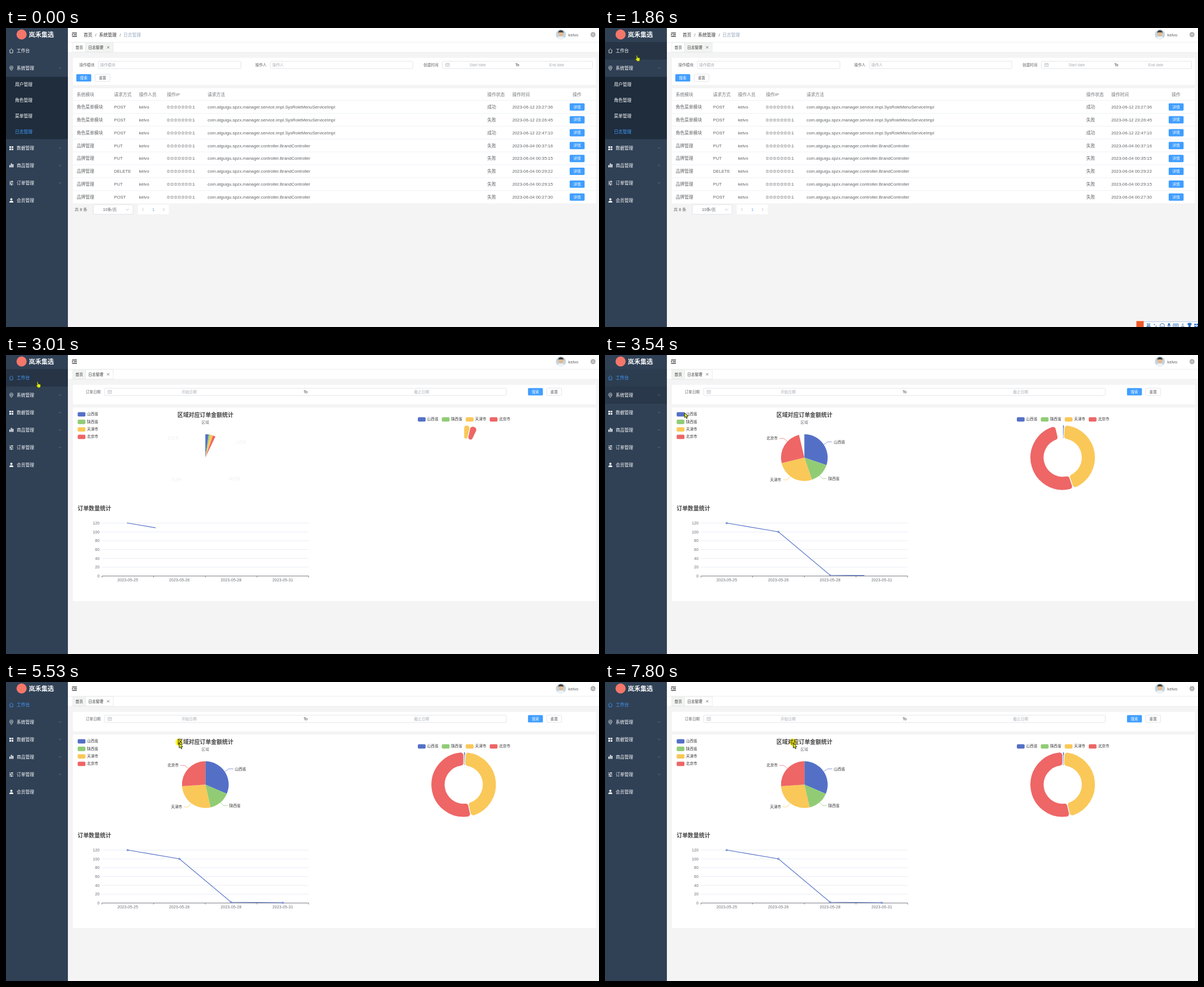
An HTML page that plays this animation: 1054 px wide and 531 px high, repeating every 8000 ms.

```html
<!DOCTYPE html>
<html lang="zh">
<head>
<meta charset="utf-8">
<style>
html, body { margin: 0; width: 100%; height: 100%; overflow: hidden; background: #f4f4f4; }
#stage { display: block; width: 100vw; height: 100vh; }
text { font-family: "Liberation Sans", "Noto Sans CJK SC", "Noto Sans CJK", sans-serif; white-space: pre; }
</style>
</head>
<body>
<svg id="stage" viewBox="0 0 1054 531" xmlns="http://www.w3.org/2000/svg"></svg>
<script>
const LOOP = 8000, CLICK = 2460, CHART = 2750;
const BLUE = '#409eff', GREY = '#606266', PALE = '#a8abb2', EDGE = '#dcdfe6';
const COLORS = ['#5470c6', '#91cc75', '#fac858', '#ee6666'];
const REGIONS = ['山西省', '陕西省', '天津市', '北京市'];

// Markup helpers; text is placed by its vertical centre
const text = (x, y, s, fill = GREY, size = 7.75, more = '') =>
  `<text x="${x}" y="${y + size * 0.36}" font-size="${size}" fill="${fill}" ${more}>${s}</text>`;
const rect = (x, y, w, h, fill, more = '') =>
  `<rect x="${x}" y="${y}" width="${w}" height="${h}" fill="${fill}" ${more}/>`;
const line = (d, color, w = 0.8, more = '') =>
  `<path d="${d}" fill="none" stroke="${color}" stroke-width="${w}" ${more}/>`;
const group = (id, body, more = '') => `<g id="${id}" ${more}>${body}</g>`;
const box = (x, y, w, h = 13) => rect(x, y, w, h, '#fff', `rx="1.6" stroke="${EDGE}" stroke-width=".8"`);
const MID = 'text-anchor="middle"', BOLD = 'font-weight="bold"', MEDIUM = 'font-weight="500"';
const small = (x, y, s, fill = GREY, more = '') => text(x, y, s, fill, 6.65, more);
const button = (x, y, s, primary) =>
  (primary ? rect(x, y, 26.5, 13, BLUE, 'rx="1.6"') : box(x, y, 26.5)) +
  small(x + 13.25, y + 6.5, s, primary ? '#fff' : GREY, MID + ' ' + MEDIUM);
const calendar = (x, y) =>
  line(`M${x} ${y - 2.5}h6.5v5.5h-6.5zM${x} ${y - .6}h6.5M${x + 2} ${y - 3.5}v1.6M${x + 4.5} ${y - 3.5}v1.6M${x + 1.5} ${y + 1.2}h3.5`, PALE, 0.6);

function sidebar() {
  const W = '#fff';
  const icon = {
    pin: line('M9.5 75.5C5 70 6.3 67.8 9.5 67.7S14 70 9.5 75.5z', W, 0.8) + '<circle cx="9.5" cy="70.8" r="1.1" fill="none" stroke="#fff" stroke-width=".7"/>',
    grid: [[6, 210], [10, 210], [6, 214], [10, 214]].map(p => rect(p[0], p[1], 3, 3, W)).join(''),
    bars: rect(6, 243.5, 1.8, 4, W) + rect(8.7, 240.5, 1.8, 7, W) + rect(11.4, 242, 1.8, 5.5, W),
    sliders: line('M6 272.5h7M6 275.3h7M6 278.1h7', W, 0.8) + rect(10, 271.3, 1.4, 2.4, W) + rect(7, 274.1, 1.4, 2.4, W) + rect(9, 276.9, 1.4, 2.4, W),
    person: '<circle cx="9.5" cy="304.2" r="1.9" fill="#fff"/><path d="M6 310q0-3.2 3.5-3.2t3.5 3.2z" fill="#fff"/>'
  };
  const item = (y, s) => text(19, y, s, W, 7.75, MEDIUM);
  const arrow = (y, id = '') => line('M-2.3-1.1 0 1.1 2.3-1.1', '#6c7a8c', 0.7, `id="${id}" transform="translate(96 ${y})"`);
  const subs = ['用户管理', '角色管理', '菜单管理', '日志管理'];
  return rect(0, 0, 110, 531, '#304156') +
    rect(0, 25, 110, 31, '#263445', 'id="hoverHome"') + rect(0, 56, 110, 30.5, '#263445', 'id="hoverSys"') +
    '<circle cx="27.7" cy="11.5" r="9" fill="#f4776a"/>' +
    text(40.5, 12, '岚禾集选', W, 11.2, BOLD) +
    group('home', line('M6 40.3 9.5 37 13 40.3M7 39.6v4.6h5v-4.6', 'currentColor', 0.8) + text(19, 40.5, '工作台', 'currentColor', 7.75, MEDIUM)) +
    icon.pin + item(71.5, '系统管理') + arrow(71, 'sysArrow') +
    `<svg id="sub" x="0" y="86.5" width="110" height="111" overflow="hidden">${rect(0, 0, 110, 111, '#1f2d3d')}` +
    subs.map((s, i) => text(16, 14 + i * 27.8, s, i == 3 ? 'currentColor' : W, 7.75, MEDIUM + (i == 3 ? ' id="logItem"' : ''))).join('') + '</svg>' +
    group('lower', icon.grid + icon.bars + icon.sliders + icon.person +
      ['数据管理', '商品管理', '订单管理', '会员管理'].map((s, i) => item(213.3 + i * 31, s) + (i < 3 ? arrow(213 + i * 31) : '')).join(''));
}

function header() {
  const tab = (id, x, w) => rect(x, 26, w, 16.8, '#fff', `id="${id}" stroke="#e3e5e8" stroke-width=".7"`);
  return rect(110, 0, 944, 43.2, '#fff') + line('M110 25.3H1054M110 43.2H1054', '#e6e8ea', 0.7) +
    line('M117.5 8.8h8.5M120.5 11.8h5.5M117.5 14.8h8.5', '#222', 1.2) + '<path d="M117.5 10.2v3.2l2-1.6z" fill="#222"/>' +
    group('crumbs', text(138, 11.8, '首页', '#303133') + text(158.5, 11.8, '/') + text(165.5, 11.8, '系统管理', '#303133') +
      text(202, 11.8, '/') + text(208.8, 11.8, '日志管理', '#97a8be')) +
    '<clipPath id="face"><circle cx="986.3" cy="11.5" r="9"/></clipPath><g clip-path="url(#face)">' +
    rect(977, 2, 19, 19, '#c3d5e2') + '<ellipse cx="986.3" cy="19.8" rx="7" ry="5" fill="#edf2f5"/>' +
    '<circle cx="986.3" cy="10.5" r="4.4" fill="#e5b990"/><path d="M981.3 10q0-6 5-6t5 6l-1-2.2h-8z" fill="#3d3a3a"/></g>' +
    text(999.3, 11.8, 'kelvo') +
    '<g fill="none" stroke="#777" stroke-width=".65"><circle cx="1043.4" cy="11.7" r="4"/><ellipse cx="1043.4" cy="11.7" rx="1.8" ry="4"/><path d="M1039.4 11.7h8M1040 9.6h6.8M1040 13.8h6.8"/></g>' +
    tab('tabHome', 118.8, 22.6) + tab('tabLog', 141.4, 49) +
    small(123.5, 34.2, '首页', '#303133') + small(146.3, 34.2, '日志管理', '#303133') +
    line('M179.6 32.3l4 4m0-4l-4 4', '#444', 0.7);
}

function logPage() {
  const role = 'com.atguigu.spzx.manager.service.impl.SysRoleMenuServiceImpl';
  const brand = 'com.atguigu.spzx.manager.controller.BrandController';
  const rows = [
    ['POST', '成功', '12 23:27:36'], ['POST', '失败', '12 23:26:45'], ['POST', '成功', '12 22:47:10'],
    ['PUT', '失败', '04 00:37:16'], ['PUT', '失败', '04 00:35:15'], ['DELETE', '失败', '04 00:29:22'],
    ['PUT', '失败', '04 00:29:15'], ['POST', '失败', '04 00:27:30']
  ];
  const cols = [125.8, 192, 236.4, 286.3, 358.3, 855.5, 900];
  const cells = (y, list, fill) => list.map((s, i) => text(cols[i], y, s, fill)).join('');
  let out = rect(119, 53, 929.5, 48, '#fff') +
    small(130.5, 65.4, '操作模块') + box(164, 59, 253.5) + small(167.5, 65.4, '操作模块', PALE) +
    small(443, 65.4, '操作人') + box(470, 59, 253) + small(473.5, 65.4, '操作人', PALE) +
    small(742, 65.4, '创建时间') + box(775.5, 59, 267) + calendar(781.5, 65.5) +
    small(838.5, 65.4, 'Start date', PALE, MID) + small(908.7, 65.4, 'To', '#303133', MID) + small(979, 65.4, 'End date', PALE, MID) +
    button(125, 82, '搜索', true) + button(158.3, 82, '重置') +
    rect(119, 107, 929.5, 204.5, '#fff') +
    cells(117.8, ['系统模块', '请求方式', '操作人员', '操作IP', '请求方法', '操作状态', '操作时间'], '#73767a') +
    text(1015, 117.8, '操作', '#73767a', 7.75, MID);
  rows.forEach(([verb, state, when], i) => {
    const y = 140.2 + i * 22.86, first = i < 3;
    out += line(`M119 ${y - 11.5}H1048.5`, '#ebeef5', 0.8) +
      cells(y, [first ? '角色菜单模块' : '品牌管理', verb, 'kelvo', '0:0:0:0:0:0:0:1', first ? role : brand, state, '2023-06-' + when]) +
      button(1001.9, y - 6.5, '详情', true);
  });
  return out + text(122, 322.6, '共 8 条', GREY, 7.2) + box(155.3, 313.8, 70.5, 17) + text(184.5, 322.8, '10条/页', GREY, 7.2, MID) +
    line('M213.6 321.3l2.4 2.4 2.4-2.4', PALE) + rect(234.3, 313.8, 55, 17, '#fff') +
    line('M244.5 320l-2.4 2.4 2.4 2.4M279 320l2.4 2.4-2.4 2.4', PALE) + text(262, 322.6, '1', BLUE, 7.2, MID);
}

const POINTS = [[216.3, 298.5], [308.2, 314], [400, 391], [491.8, 392]];
function dashboard() {
  const swatch = (x, y, i) => rect(x, y - 3.9, 13.8, 7.8, COLORS[i], 'rx="2"') + small(x + 16.6, y - .4, REGIONS[i], '#333');
  const slices = id => COLORS.map((c, i) => `<path id="${id + i}" fill="${c}"/>`).join('');
  const leads = ['M389 159l7-4.8h8', 'M380.5 213.5l6.5 6h7', 'M329 215.5l-5 6.3h-8', 'M324 153.5l-6-5.3h-8.5'];
  const names = [[406.8, 154.2], [397, 219.4], [293.3, 221.8], [287, 148]];
  let axes = '';
  for (let i = 0; i < 7; i++) {
    const y = 392.5 - i * 15.67;
    axes += line(`M170.5 ${y}H538`, i ? '#e0e6f1' : '#6e7079', i ? 0.7 : 0.9) + text(166.3, y, i * 20, '#6e7079', 7.2, 'text-anchor="end"');
  }
  for (let i = 0; i < 5; i++) axes += line(`M${170.5 + i * 91.87} 392.5v2.8`, '#6e7079', 0.8);
  ['25', '26', '28', '31'].forEach((d, i) => axes += text(POINTS[i][0], 399.6, '2023-05-' + d, '#6e7079', 7.2, MID));
  return rect(119, 53, 929.5, 34.5, '#fff') + small(141.7, 65.4, '订单日期') + box(175.3, 59, 714) + calendar(181.2, 65.5) +
    small(325.5, 65.4, '开始日期', PALE, MID) + small(532.4, 65.4, 'To', '#303133', MID) + small(738.8, 65.4, '截止日期', PALE, MID) +
    button(927.8, 58.8, '搜索', true) + button(961, 58.8, '重置') +
    rect(119, 93.3, 929.5, 343.7, '#fff') +
    group('charts',
      REGIONS.map((_, i) => swatch(127.4, 105.4 + i * 13.35, i)).join('') +
      text(354.4, 106.3, '区域对应订单金额统计', '#464646', 9.95, MID + ' ' + BOLD) + small(354.2, 119.8, '区域', '#6e7079', MID) +
      slices('pie') +
      leads.map((d, i) => line(d, COLORS[i], 0.7, 'class="lead" pathLength="1"')).join('') +
      group('names', names.map((p, i) => small(p[0], p[1], REGIONS[i], '#333')).join('')) +
      [732, 774.6, 817.2, 859.8].map((x, i) => swatch(x, 114.4, i)).join('') +
      `<g stroke="#fff" stroke-width="1.3">${slices('ring')}</g>` +
      text(127.2, 272.4, '订单数量统计', '#464646', 9.95, BOLD) + axes +
      '<clipPath id="wipe"><rect id="wipeBox" x="170" y="290" height="110"/></clipPath>' +
      line('M' + POINTS.join('L'), COLORS[0], 1.15, 'clip-path="url(#wipe)"') +
      POINTS.map(p => `<circle class="dot" cx="${p[0]}" cy="${p[1]}" fill="#fff" stroke="${COLORS[0]}"/>`).join(''));
}

function imeBar() {
  const c = '#2f6fc1';
  return rect(954, 521.7, 104, 12, '#fff', 'rx="1" stroke="#9fc0e6" stroke-width=".8"') +
    rect(944.5, 520.5, 13, 12, '#f0592b') + text(966, 528.8, '英', c, 8, MID + ' ' + BOLD) +
    `<g fill="${c}"><circle cx="976.5" cy="526.5" r="1"/><circle cx="979.5" cy="529.5" r="1"/>` +
    '<rect x="1000.8" y="524" width="3.2" height="5" rx="1.6"/><path d="M1035 525l2.5-1.2h3l2.5 1.2-1 2.4-1-.4v4h-4v-4l-1 .4z"/>' +
    '<path d="M1047.5 525h3v3h-3zM1051.5 525h3v3h-3zM1047.5 529h3v3h-3zM1051.5 529h3v3h-3z"/></g>' +
    line('M999.8 527.5q0 3 2.6 3t2.6-3M1010 525.5h9v7h-9zM1011.5 527.6h6M1011.5 529.6h6', c, 0.9) +
    `<circle cx="990.4" cy="528.8" r="4" fill="none" stroke="${c}"/><path d="M988.2 529.5q2.2 2.2 4.4 0" fill="none" stroke="${c}" stroke-width=".8"/>` +
    '<circle cx="1026.8" cy="526.3" r="1.7" fill="#9fb3c8"/><path d="M1023 532q0-3.5 3.8-3.5t3.8 3.5z" fill="#9fb3c8"/>';
}

const pointer = '<circle id="halo" cx="0" cy="-1" r="6.4" fill="#fff200" opacity=".85" style="mix-blend-mode:multiply"/>' +
  '<path id="arrow" d="M.3.3V9.2L2.4 7.4 3.9 10.8 5.4 10.1 4 6.9H6.8z" fill="#dbe62e" stroke="#1c1c08" stroke-width=".9" stroke-linejoin="round"/>' +
  '<path id="hand" d="M-1.2 1Q-.3-.6.7 1L1.4 4.2 4.8 5Q6 5.5 5.7 7.6L4.8 11.2H.6L-2.4 7.2Q-2.6 5.8-.4 6.4z" fill="#d9ea1f" stroke="#2a2d0c" stroke-width=".8" stroke-linejoin="round"/>';

document.getElementById('stage').innerHTML =
  rect(0, 0, 1054, 531, '#f4f4f4') + group('logs', logPage()) + group('dash', dashboard()) +
  header() + sidebar() + group('ime', imeBar()) + group('cursor', pointer);

const $ = id => document.getElementById(id);
const set = (id, name, v) => $(id).setAttribute(name, v);
const show = (id, v) => set(id, 'opacity', +v);
const ramp = (t, a, b) => Math.min(1, Math.max(0, (t - a) / (b - a)));
const inOut = p => p < 0.5 ? 4 * p ** 3 : 1 - 4 * (1 - p) ** 3;
const smooth = p => p * p * (3 - 2 * p);
const fade = (t, a, b) => ramp(t, a, a + 150) * (1 - ramp(t, b, b + 300));

// Pointer stops: time, x, y
const PATH = [
  [70, 789, 531], [490, 957, 355], [690, 957, 355], [1440, 62, 64], [1510, 62, 64], [1860, 56.5, 48],
  [2460, 56.5, 48], [2530, 56, 47], [3240, 56, 47], [3540, 141, 102], [4010, 163, 115], [4060, 163, 115],
  [4300, 184, 131], [4470, 184, 131], [5270, 307.5, 108], [5560, 307.5, 108], [6080, 336, 108],
  [6140, 337, 108], [6270, 337, 108], [6840, 364, 107.6], [7040, 399, 107.6], [7110, 400, 107.6],
  [7350, 400, 107.6], [7800, 334.3, 108]
];
function pointerAt(t) {
  const i = PATH.findIndex(k => k[0] > t);
  if (i < 1) return i ? PATH[PATH.length - 1].slice(1) : PATH[0].slice(1);
  const a = PATH[i - 1], b = PATH[i], p = smooth(ramp(t, a[0], b[0]));
  return [a[1] + (b[1] - a[1]) * p, a[2] + (b[2] - a[2]) * p];
}

const DEG = Math.PI / 180;
const polar = (cx, cy, r, a) => `${(cx + r * Math.sin(a)).toFixed(2)} ${(cy - r * Math.cos(a)).toFixed(2)}`;
function wedge(cx, cy, r, a, b) {
  return `M${cx} ${cy}L${polar(cx, cy, r, a)}A${r} ${r} 0 ${+(b - a > Math.PI)} 1 ${polar(cx, cy, r, b)}z`;
}
// Ring sector with rounded corners that shrink when the sector is narrow
function roundSector(cx, cy, r0, r1, a, b, max) {
  if (b - a < 0.001) return '';
  const s = Math.sin(Math.min(b - a, Math.PI) / 2);
  const c1 = Math.min(max, r1 * s / (1 + s)), c0 = s > 0.99 ? max : Math.min(max, r0 * s / (1 - s));
  const o1 = Math.asin(c1 / (r1 - c1)), o0 = Math.asin(c0 / (r0 + c0));
  const h1 = (r1 - c1) * Math.cos(o1), h0 = (r0 + c0) * Math.cos(o0);
  const at = (r, ang) => polar(cx, cy, r, ang);
  const arc = (r, big, dir, end) => `A${r} ${r} 0 ${+big} ${dir} ${end}`;
  return 'M' + at(h1, a) + arc(c1, 0, 1, at(r1, a + o1)) + arc(r1, b - a - 2 * o1 > Math.PI, 1, at(r1, b - o1)) +
    arc(c1, 0, 1, at(h1, b)) + 'L' + at(h0, b) + arc(c0, 0, 1, at(r0, b - o0)) +
    arc(r0, b - a - 2 * o0 > Math.PI, 0, at(r0, a + o0)) + arc(c0, 0, 1, at(h0, a)) + 'z';
}

const PIE = [0, 113, 167, 266, 359.99], RING = [0, 3, 3, 167, 360];
const leads = [...document.querySelectorAll('.lead')], dots = [...document.querySelectorAll('.dot')];

function drawCharts(t) {
  const p = ramp(t, CHART, CHART + 1000), e = inOut(p);
  show('charts', t >= CHART);
  for (let i = 0; i < 4; i++) {
    set('pie' + i, 'd', wedge(354.3, 182.2, 41.5, PIE[i] * e * DEG, PIE[i + 1] * e * DEG));
    set('ring' + i, 'd', roundSector(813.5, 182.2, 33.3, 58, RING[i] * e * DEG, RING[i + 1] * e * DEG, 5.5));
  }
  show('names', e);
  leads.forEach(l => { l.setAttribute('stroke-dasharray', `${e} 2`); l.setAttribute('opacity', Math.min(1, e * 3)); });
  set('wipeBox', 'width', 368 * p);
  dots.forEach((d, i) => {
    const start = CHART + (POINTS[i][0] - 170) / 368 * 1000, k = ramp(t, start, start + 200);
    d.setAttribute('r', 1.3 * k);
    d.setAttribute('stroke-width', 1.1 * k);
  });
}

function draw(t) {
  const after = t >= CLICK, fold = smooth(ramp(t, CLICK, CLICK + 300));
  show('logs', 1 - ramp(t, CLICK, CLICK + 140));
  show('dash', ramp(t, CLICK + 140, CLICK + 280));
  show('crumbs', 1 - ramp(t, CLICK, CLICK + 280));
  set('sub', 'height', 111 * (1 - fold));
  set('lower', 'transform', `translate(0 ${-111 * fold})`);
  set('sysArrow', 'transform', `translate(96 71) rotate(${180 * (1 - fold)})`);
  set('home', 'color', after ? BLUE : '#fff');
  set('logItem', 'color', after ? '#fff' : BLUE);
  set('tabHome', 'fill', after ? '#f2f4f1' : '#fff');
  set('tabLog', 'fill', after ? '#fff' : '#f2f4f1');
  show('hoverHome', fade(t, 1600, 3330));
  show('hoverSys', Math.max(fade(t, 1300, 1600), fade(t, 3310, 3440)));
  show('ime', t >= 280 && t < 2600);
  drawCharts(t);

  const [x, y] = pointerAt(t), link = x < 110;
  set('cursor', 'transform', `translate(${x.toFixed(2)} ${y.toFixed(2)})`);
  show('cursor', t >= 70);
  show('hand', link);
  show('arrow', !link);
  show('halo', t >= 5330 && t < 6300 || t >= 7700 ? 0.85 : 0);
}

const begin = performance.now();
(function tick() {
  draw((performance.now() - begin) % LOOP);
  requestAnimationFrame(tick);
})();
</script>
</body>
</html>
```
